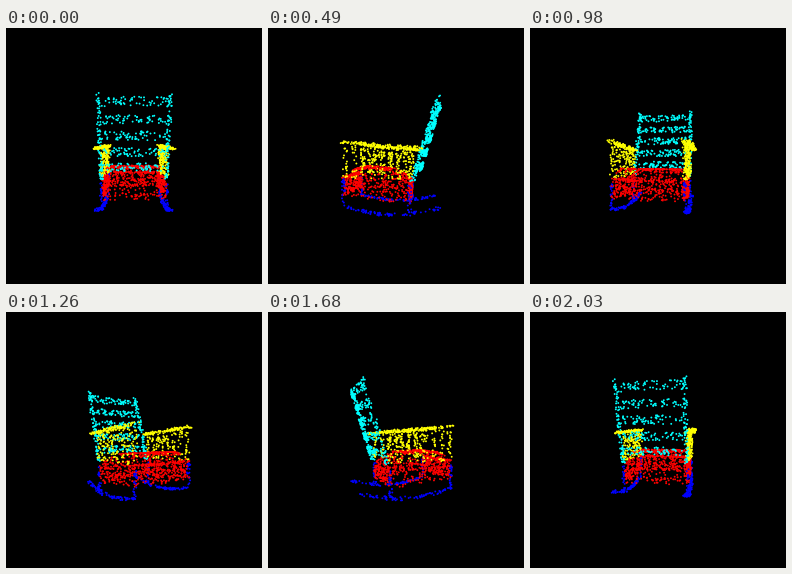
These frames come from a looping animation (256x256 px, 2.1 s). A matplotlib script:

```python
import numpy as np
import matplotlib.pyplot as plt
from matplotlib.animation import FuncAnimation

SIZE, DPI = 256, 100
FRAMES, STEP = 30, 70
DIST = 3.0
FOCAL = SIZE / 2 / np.tan(np.radians(30))
CYAN, YELLOW, RED, BLUE = (0, 1, 1), (1, 1, 0), (1, 0, 0), (0, 0, 1)

rng = np.random.default_rng(11)
cloud, tints = [], []


def add(color, x, y, z):
    """Append points: x to the side, y up, z towards the backrest."""
    pts = np.column_stack(np.broadcast_arrays(x, y, z))
    cloud.append(pts)
    tints.append(np.tile(color, (len(pts), 1)))


def span(lo, hi, n):
    return rng.uniform(lo, hi, n)


def lean(y):
    return 0.323 + 0.3 * y


def arm_top(z):
    return 0.122 - 0.08 * z


def seat_top(z):
    return np.interp(z, [-0.6, -0.45, -0.05, 0.22], [-0.25, -0.15, -0.175, -0.34])


def seat_base(z):
    return -0.49 - 0.07 * (z + 0.6) / 0.82


def rocker(z):
    return -0.68 + 0.28 * (z + 0.03) ** 2


def backrest():
    for side in (-1, 1):
        y = span(-0.31, 0.70, 72)
        add(CYAN, side * span(0.385, 0.43, 72), y, lean(y) + span(-0.03, 0.03, 72))
    for k in range(5):
        mid = 0.6 - 0.184 * k
        half = 0.41 if k < 3 else 0.37
        x = span(-half, half, 62)
        y = mid + span(-0.05, 0.05, 62)
        add(CYAN, x, y, lean(y) + 0.07 * (1 - (x / 0.42) ** 2) + span(-0.015, 0.015, 62))


def arms():
    for side in (-1, 1):
        z = span(-0.62, 0.35, 95)
        outer = np.interp(z, [-0.6, -0.45, 0.35], [0.46, 0.49, 0.51])
        x = 0.375 + (outer - 0.375) * rng.random(95)
        add(YELLOW, side * x, arm_top(z) + span(-0.02, 0.012, 95), z)
        for zc in np.linspace(-0.57, 0.2, 8):
            z = zc + span(-0.03, 0.03, 20)
            y = -0.27 + (arm_top(z) + 0.27) * rng.random(20)
            add(YELLOW, side * span(0.39, 0.435, 20), y, z)


def seat():
    # Thin cushion with a denser front crest
    z = span(-0.6, 0.22, 150)
    add(RED, span(-0.4, 0.4, 150), seat_top(z), z)
    z = span(-0.5, -0.42, 70)
    add(RED, span(-0.38, 0.38, 70), seat_top(z), z)
    # Frame below the cushion
    add(RED, span(-0.42, 0.42, 60), span(-0.275, -0.25, 60), -0.6)
    add(RED, span(-0.42, 0.42, 140), span(-0.49, -0.26, 140), span(-0.61, -0.57, 140))
    add(RED, span(-0.38, 0.38, 90), span(-0.56, -0.36, 90), span(0.18, 0.22, 90))
    for side in (-1, 1):
        z = span(-0.6, 0.22, 115)
        top = np.minimum(seat_top(z), -0.265)
        y = seat_base(z) + (top - seat_base(z)) * rng.random(115)
        add(RED, side * span(0.37, 0.42, 115), y, z)


def runners():
    for side in (-1, 1):
        z = span(-0.62, 0.56, 85)
        add(BLUE, side * span(0.39, 0.445, 85), rocker(z) + span(-0.02, 0.015, 85), z)
        add(BLUE, side * span(0.40, 0.43, 20), span(-0.58, -0.27, 20), span(-0.61, -0.57, 20))
        add(BLUE, side * span(0.40, 0.43, 18), span(-0.66, -0.33, 18), span(0.18, 0.22, 18))


for part in (backrest, arms, seat, runners):
    part()
cloud, tints = np.vstack(cloud), np.vstack(tints)

fig = plt.figure(figsize=(SIZE / DPI, SIZE / DPI), dpi=DPI, facecolor="black")
ax = fig.add_axes([0, 0, 1, 1])
ax.set(xlim=(0, SIZE), ylim=(SIZE, 0))
ax.axis("off")
dots = ax.scatter(cloud[:, 0], cloud[:, 1], s=(1.9 * 72 / DPI) ** 2, linewidths=0)


def draw(i):
    a = 2 * np.pi * i / FRAMES
    x, y, z = cloud.T
    depth = DIST - (z * np.cos(a) - x * np.sin(a))
    px = SIZE / 2 + FOCAL * (x * np.cos(a) + z * np.sin(a)) / depth
    py = SIZE / 2 - FOCAL * y / depth
    order = np.argsort(-depth)
    dots.set_offsets(np.column_stack([px, py])[order])
    dots.set_facecolors(tints[order])
    return (dots,)


anim = FuncAnimation(fig, draw, frames=FRAMES, interval=STEP, repeat=True, repeat_delay=0)
plt.show()
```
